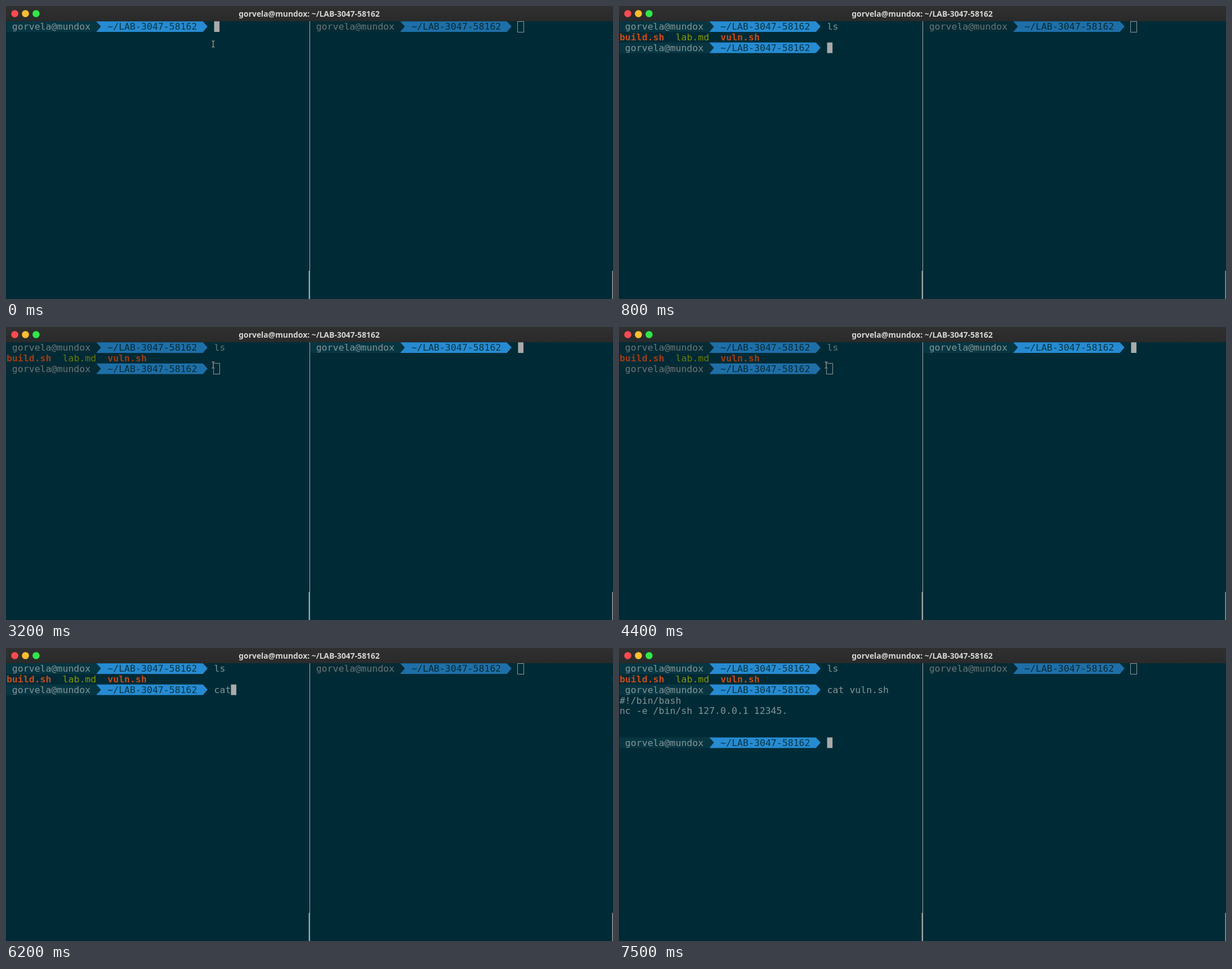
Write an HTML page that moves like this. It is 1078 by 520 pixels and loops after 8000 ms.

```html
<!DOCTYPE html>
<html lang="en">
<head>
<meta charset="utf-8">
<title>Terminal</title>
<style>
  html, body { margin: 0; width: 100%; height: 100%; overflow: hidden; background: #002b36; }
  svg { display: block; }
  text { white-space: pre; }
  .title { font: bold 13.9px "Noto Sans", "Open Sans", sans-serif; fill: #d6d5d2; text-anchor: middle; }
  .pane { font: 16.55px "DejaVu Sans Mono", monospace;
    --fg: #839496; --seg: #073642; --blue: #268bd2; --red: #cb4b16; --green: #859900; }
  .dim { --fg: #697678; --seg: #062b35; --blue: #1e6fa8; --red: #a23c12; --green: #6a7a00; }
  .fg { fill: var(--fg); }
  .seg { fill: var(--seg); }
  .blue { fill: var(--blue); }
  .red { fill: var(--red); font-weight: bold; }
  .green { fill: var(--green); }
  .block { fill: #aaa; }
  .hollow { fill: none; stroke: #8f999b; }
  .thumb { fill: #949a9b; }
</style>
</head>
<body>
<svg width="1078" height="520" viewBox="0 0 1078 520">
  <defs>
    <linearGradient id="bar" x2="0" y2="1">
      <stop stop-color="#303030"/><stop offset="1" stop-color="#2a2a2a"/>
    </linearGradient>
    <path id="beam" d="M365.5 62H367.3L368 62.7L368.7 62H370.5M368 62.5V72.5M365.5 73H367.3L368 72.3L368.7 73H370.5"/>
  </defs>
  <rect width="1078" height="520" fill="#002b36"/>
  <rect width="1078" height="27" fill="url(#bar)"/>
  <circle cx="15.6" cy="13.5" r="6.3" fill="#fc4b50"/>
  <circle cx="34.5" cy="13.5" r="6.3" fill="#fdbe30"/>
  <circle cx="53.4" cy="13.5" r="6.3" fill="#30e747"/>
  <text class="title" x="538.5" y="18.5">gorvela@mundox: ~/LAB-3047-58162</text>
  <g id="left"></g>
  <g id="right"></g>
  <rect x="539" y="27" width="1" height="493" fill="#a9afb0"/>
  <rect class="thumb" x="537.5" y="470" width="1.5" height="50"/>
  <rect class="thumb" x="1076.5" y="470" width="1.5" height="50"/>
  <g id="mouse" fill="none">
    <use href="#beam" stroke="#10191c" stroke-width="2.4"/>
    <use href="#beam" stroke="#d0d5d6"/>
  </g>
</svg>
<script>
const LOOP = 8000, CW = 9.965, RH = 18.79, TOP = 27.2, PROMPT = 37, TIP = 8.3;
const USER = 'gorvela@mundox', DIR = '~/LAB-3047-58162';

// Each step only names what changes.
const steps = [
  { at: 0, cmds: [''], focus: 'left', on: true, mouse: true },
  { at: 200, on: false },
  { at: 400, on: true, mouse: false },
  { at: 500, cmds: ['l'] },
  { at: 600, cmds: ['ls'] },
  { at: 800, cmds: ['ls', ''] },
  { at: 1400, on: false },
  { at: 2000, on: true },
  { at: 3200, focus: 'right', mouse: true },
  { at: 3800, on: false },
  { at: 4400, on: true },
  { at: 5300, focus: 'left' },
  { at: 5600, on: false },
  { at: 5900, cmds: ['ls', 'c'], on: true, mouse: false },
  { at: 6200, cmds: ['ls', 'cat'] },
  { at: 6500, cmds: ['ls', 'cat '] },
  { at: 7000, cmds: ['ls', 'cat vuln.sh '] },
  { at: 7500, cmds: ['ls', 'cat vuln.sh', ''] }
];
const promptRows = [0, 2, 7];

const $ = id => document.getElementById(id);

function pane(id, x0, cmds, active, on) {
  const x = col => x0 + col * CW;
  const y = row => TOP + row * RH;
  const text = (row, col, cls, s) =>
    `<text class="${cls}" x="${x(col)}" y="${y(row) + 15.1}">${s}</text>`;

  const prompt = (row, cmd) => {
    const t = y(row), m = t + 9.1, b = t + RH, a = x(16), e = x(35);
    return `<path class="seg" d="M${x0} ${t}H${a}L${a + TIP} ${m}L${a} ${b}H${x0}Z"/>` +
      `<path class="blue" d="M${a} ${t}H${e}L${e + TIP} ${m}L${e} ${b}H${a}L${a + TIP} ${m}Z"/>` +
      text(row, 1, 'fg', USER) + text(row, 18, 'seg', DIR) + text(row, PROMPT, 'fg', cmd);
  };

  let out = cmds.map((cmd, i) => prompt(promptRows[i], cmd)).join('');
  if (cmds.length > 1)
    out += text(1, 0, 'red', 'build.sh') + text(1, 10, 'green', 'lab.md') + text(1, 18, 'red', 'vuln.sh');
  if (cmds.length > 2)
    out += text(3, 0, 'fg', '#!/bin/bash') + text(4, 0, 'fg', 'nc -e /bin/sh 127.0.0.1 12345.');

  const last = cmds.length - 1;
  const cx = x(PROMPT + cmds[last].length), cy = y(promptRows[last]);
  if (!active)
    out += `<rect class="hollow" x="${Math.floor(cx) - .5}" y="${Math.floor(cy) + .5}" width="11" height="19"/>`;
  else if (on)
    out += `<rect class="block" x="${cx}" y="${cy}" width="${CW - .4}" height="${RH}"/>`;

  const g = $(id);
  g.setAttribute('class', active ? 'pane' : 'pane dim');
  g.innerHTML = out;
}

let shown = -1;
function draw(now) {
  const t = now % LOOP;
  const n = steps.filter(s => s.at <= t).length;
  if (n !== shown) {
    shown = n;
    const s = Object.assign({}, ...steps.slice(0, n));
    pane('left', 0.9, s.cmds, s.focus === 'left', s.on);
    pane('right', 540.7, [''], s.focus === 'right', s.on);
    $('mouse').style.display = s.mouse ? '' : 'none';
  }
}

const start = performance.now();
function tick() {
  draw(performance.now() - start);
  requestAnimationFrame(tick);
}
tick();
</script>
</body>
</html>
```
